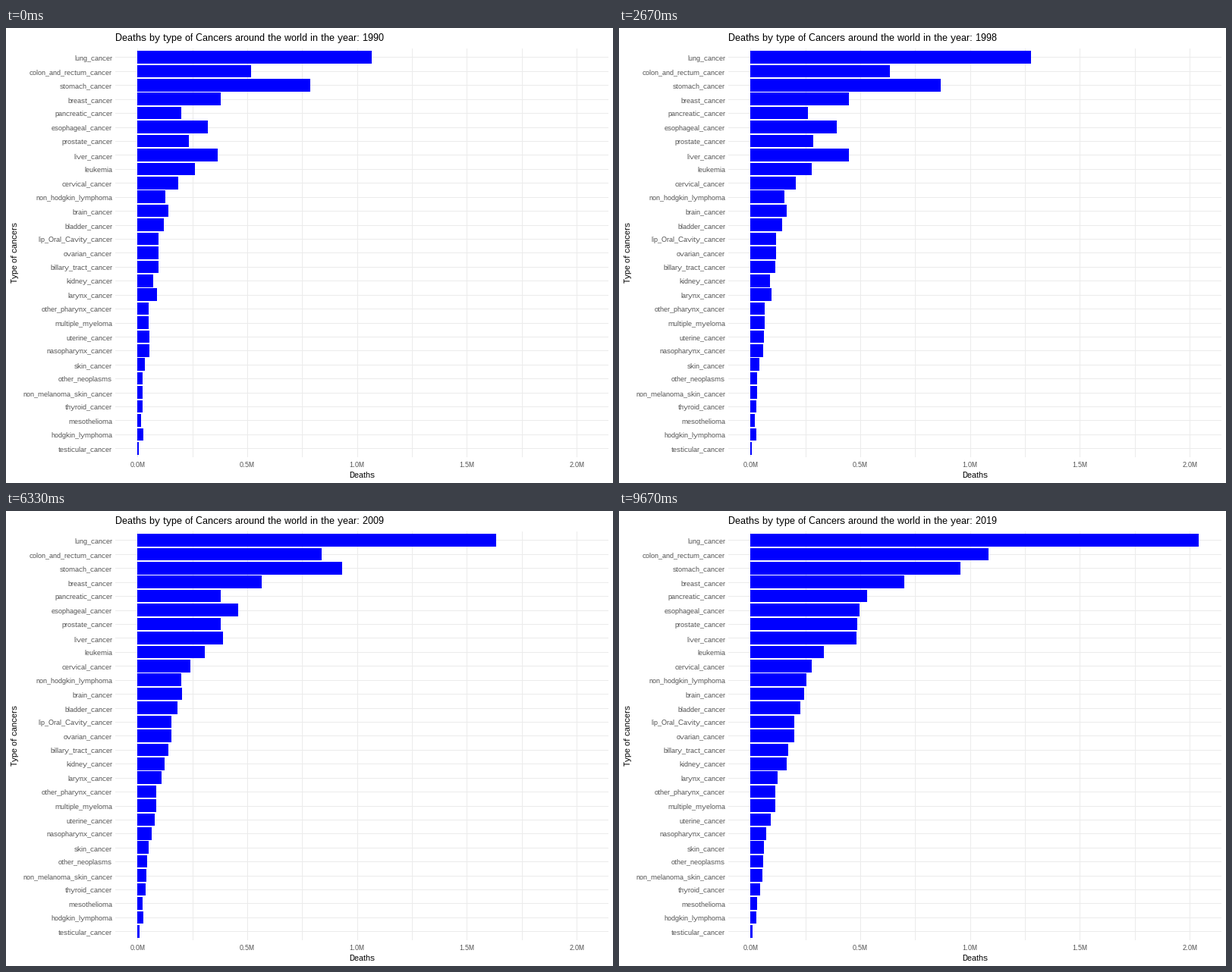
Recreate the animation shown at these times as a matplotlib script. Size 800 px wide and 600 px high, loop 10 s.

```python
import math

import matplotlib.pyplot as plt
import numpy as np
from matplotlib.animation import FuncAnimation
from matplotlib.patches import Rectangle

W, H, DPI = 800, 600, 96
LOOP, TICK_MS = 10000, 50
FIRST, LAST = 1990, 2019
YEARS = LAST - FIRST + 1

LEFT, RIGHT, TOP, BOTTOM = 144, 794, 27, 566   # panel
ZERO, QUARTER = 173, 72.34                     # x of 0.0M, px per 0.25M
ROW0, STEP = 38.455, 18.4237                   # first row centre, row pitch
GRID, GREY, BAR = "#ebebeb", "#4d4d4d", "#0000ff"

plt.rcParams.update({
    "font.family": "Liberation Sans",
    "text.hinting": "native",
    "text.hinting_factor": 1,
    "text.kerning_factor": 6,
})

# Bar length in px in the first and last year; steady yearly growth between.
SPAN = {
    "lung_cancer": (309, 591),
    "colon_and_rectum_cancer": (150, 314),
    "stomach_cancer": (228, 277),
    "breast_cancer": (110, 203),
    "pancreatic_cancer": (58, 154),
    "esophageal_cancer": (93, 144),
    "prostate_cancer": (68, 141),
    "liver_cancer": (106, 140),
    "leukemia": (76, 97),
    "cervical_cancer": (54, 81),
    "non_hodgkin_lymphoma": (37, 74),
    "brain_cancer": (41, 71),
    "bladder_cancer": (35, 66),
    "lip_Oral_Cavity_cancer": (28, 58),
    "ovarian_cancer": (28, 58),
    "billary_tract_cancer": (28, 50),
    "kidney_cancer": (21, 48),
    "larynx_cancer": (26, 36),
    "other_pharynx_cancer": (15, 33),
    "multiple_myeloma": (15, 33),
    "uterine_cancer": (16, 27),
    "nasopharynx_cancer": (16, 21),
    "skin_cancer": (10, 18),
    "other_neoplasms": (7, 17),
    "non_melanoma_skin_cancer": (7, 16),
    "thyroid_cancer": (7, 13),
    "mesothelioma": (5, 9),
    "hodgkin_lymphoma": (8, 8),
    "testicular_cancer": (2, 3),
}

# The few bars that rise and fall on the way.
TURNS = {
    "stomach_cancer": {2005: 274, 2014: 264},
    "esophageal_cancer": {2005: 136, 2014: 130},
    "liver_cancer": {1995: 131, 2001: 129, 2005: 104},
}


def snap(v):
    return math.floor(v + 0.5)


def length(name, year):
    first, last = SPAN[name]
    keys = {FIRST: first, **TURNS.get(name, {}), LAST: last}
    return snap(np.exp(np.interp(year, list(keys), np.log(list(keys.values())))))


fig = plt.figure(figsize=(W / DPI, H / DPI), dpi=DPI, facecolor="white")
ax = fig.add_axes([0, 0, 1, 1])
ax.set_xlim(0, W)
ax.set_ylim(H, 0)
ax.axis("off")


def box(x, y, w, h, color, z):
    return ax.add_patch(Rectangle((x, y), w, h, fc=color, lw=0,
                                  antialiased=False, zorder=z))


def label(x, y, s, px, color="black", ha="left", rotation=0):
    return ax.text(x, y, s, fontsize=px * 72 / DPI, color=color, ha=ha,
                   va="baseline", rotation=rotation,
                   rotation_mode="anchor", zorder=3)


for k in range(9):
    x = ZERO + 0.4 + k * QUARTER
    box(snap(x), TOP, 1, BOTTOM - TOP, GRID, 1)
    if k % 2 == 0:
        label(x, 579, f"{k / 4:.1f}M", 9, GREY, "center")

bars = {}
for i, name in enumerate(SPAN):
    cy = ROW0 + i * STEP
    top, bottom = snap(cy - 0.45 * STEP), snap(cy + 0.45 * STEP)
    box(LEFT, snap(cy), RIGHT - LEFT, 1, GRID, 1)
    bars[name] = box(ZERO, top, 0, bottom - top, BAR, 2)
    label(140, snap(cy + 4.1), name, 9, GREY, "right")

label(469, 593, "Deaths", 11, ha="center")
label(15, 296.5, "Type of cancers", 11, ha="center", rotation=90)
title = label(LEFT, 17, "", 13)


def draw(n):
    # A year starts on the tick that contains its moment.
    year = FIRST + ((n + 1) * TICK_MS - 1) * YEARS // LOOP
    for name, bar in bars.items():
        bar.set_width(length(name, year))
    title.set_text(f"Deaths by type of Cancers around the world in the year: {year}")
    return [*bars.values(), title]


anim = FuncAnimation(fig, draw, frames=LOOP // TICK_MS, interval=TICK_MS,
                     repeat=True, repeat_delay=0, blit=False)
plt.show()
```
